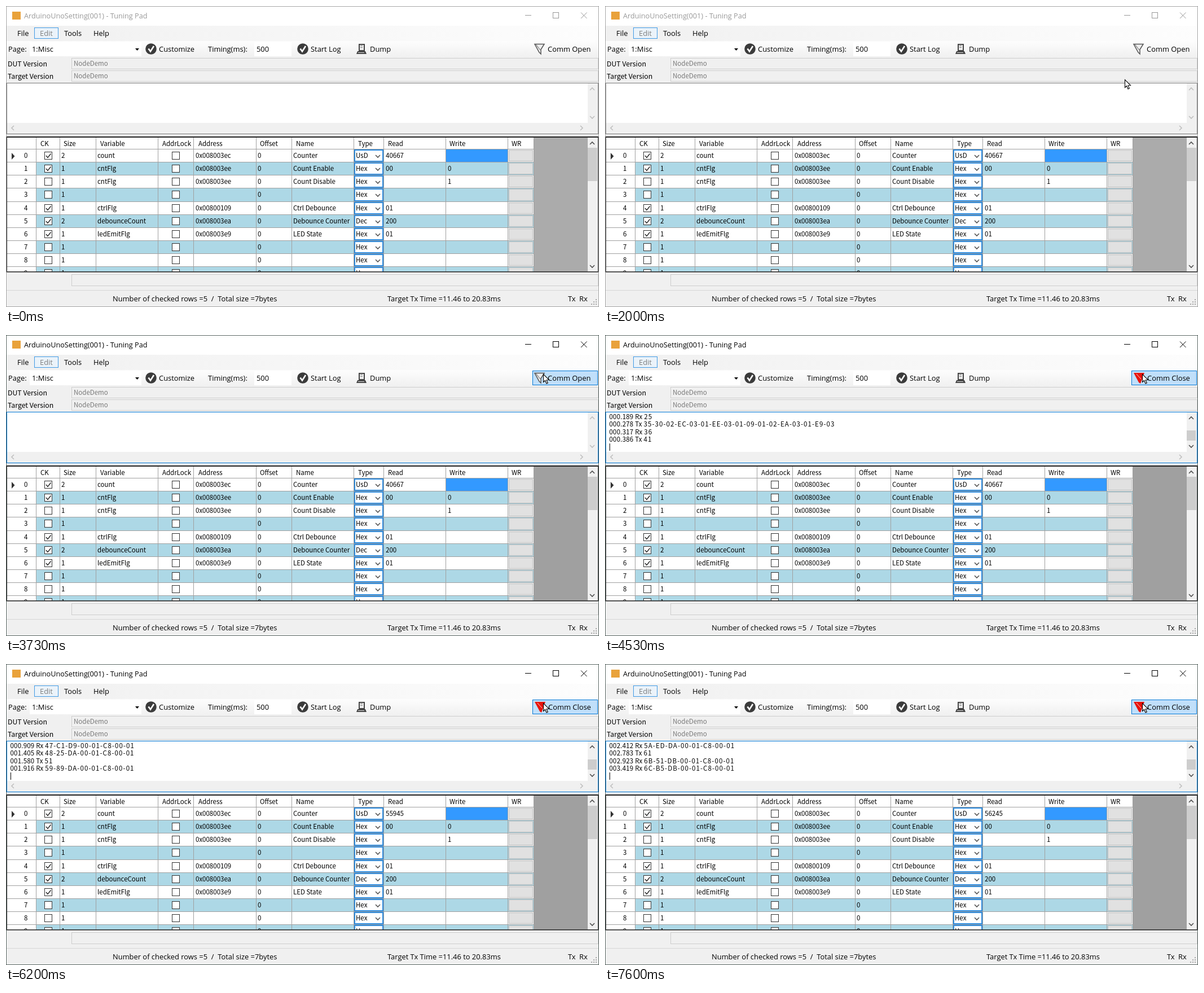
These frames come from a looping animation (1051 by 533 pixels, 8 s). An HTML page with a canvas:

```html
<!DOCTYPE html>
<html lang="en">
<head>
<meta charset="utf-8">
<title>Serial monitor</title>
<style>
html, body { margin: 0; width: 100%; height: 100%; overflow: hidden; background: #f0f0f0; }
canvas { display: block; }
</style>
</head>
<body>
<canvas id="stage" width="1051" height="533"></canvas>
<script>
const c = document.getElementById('stage').getContext('2d');
const LOOP = 8000, TICK = 0.015; // ticks per ms
const UI = '12.9px "Open Sans", "Noto Sans", sans-serif';
const GRID = '11.5px "Noto Sans CJK JP", "Noto Sans", sans-serif';
const LABEL = '12.3px "Noto Sans CJK JP", "Noto Sans", sans-serif';
const BLUE = '#0078d7', FACE = '#f0f0f0', RULE = '#a0a0a0';

// Ticks of the main events
const ACTIVATE = 48, CARET_OFF = 56, PRESS = 58, OPEN = 61;

const log = [
  [61, '000.022 Tx 11'],
  [63, '000.100 Rx 12'], [63, '000.144 Tx 24'],
  [65, '000.189 Rx 25'],
  [66, '000.278 Tx 35-30-02-EC-03-01-EE-03-01-09-01-02-EA-03-01-E9-03'],
  [67, '000.317 Rx 36'], [67, '000.386 Tx 41'],
  [75, '000.909 Rx 47-C1-D9-00-01-C8-00-01'],
  [83, '001.405 Rx 48-25-DA-00-01-C8-00-01'],
  [86, '001.580 Tx 51'],
  [91, '001.916 Rx 59-89-DA-00-01-C8-00-01'],
  [98, '002.412 Rx 5A-ED-DA-00-01-C8-00-01'],
  [103, '002.783 Tx 61'],
  [106, '002.923 Rx 6B-51-DB-00-01-C8-00-01'],
  [112, '003.419 Rx 6C-B5-DB-00-01-C8-00-01']
];
const txOn = [[61, 63], [63, 65], [66, 67], [67, 68], [103, 104]];
const rxOn = [[65, 66], [75, 76], [83, 84], [91, 93], [98, 99], [106, 108], [113, 114]];

// Pointer path: tick, x, y
const path = [[13, 1003, 392], [20, 882, 235], [24, 882, 235], [30, 921, 130],
  [35, 1000, 64], [37, 1037, 70], [39, 952, 69]];

const cols = [53, 95, 159, 269, 332, 443, 506, 616, 669, 779, 889, 935];
const heads = [['CK', 61], ['Size', 102], ['Variable', 167], ['AddrLock', 277], ['Address', 341],
  ['Offset', 450], ['Name', 514], ['Type', 624], ['Read', 677], ['Write', 786], ['WR', 896]];
const rows = [
  { ck: 1, size: 2, v: 'count', a: '0x008003ec', name: 'Counter', type: 'UsD', read: '40667' },
  { ck: 1, v: 'cntFlg', a: '0x008003ee', name: 'Count Enable', read: '00', write: '0' },
  { v: 'cntFlg', a: '0x008003ee', name: 'Count Disable', write: '1' },
  {},
  { ck: 1, v: 'ctrlFlg', a: '0x00800109', name: 'Ctrl Debounce', read: '01' },
  { ck: 1, size: 2, v: 'debounceCount', a: '0x008003ea', name: 'Debounce Counter', type: 'Dec', read: '200' },
  { ck: 1, v: 'ledEmitFlg', a: '0x008003e9', name: 'LED State', read: '01' },
  {}, {}, {}
];

function rect(x, y, w, h, fill) {
  c.fillStyle = fill;
  c.fillRect(x, y, w, h);
}
function frame(x, y, w, h, edge, fill, lw = 1) {
  if (fill) rect(x, y, w, h, fill);
  c.strokeStyle = edge;
  c.lineWidth = lw;
  c.strokeRect(x + lw / 2, y + lw / 2, w - lw, h - lw);
}
function text(s, x, y, font = UI, color = '#000') {
  c.font = font;
  c.fillStyle = color;
  c.fillText(s, x, y);
}
function trace(pts, close) {
  c.beginPath();
  pts.forEach(([x, y]) => c.lineTo(x, y));
  if (close) c.closePath();
}
function line(pts, color, lw = 1) {
  trace(pts);
  c.strokeStyle = color;
  c.lineWidth = lw;
  c.stroke();
}
function poly(pts, fill, edge, lw = 1) {
  trace(pts, true);
  if (fill) { c.fillStyle = fill; c.fill(); }
  if (edge) { c.strokeStyle = edge; c.lineWidth = lw; c.stroke(); }
}
function chevron(x, y, dir, color, s = 4) {
  const d = s * 0.5;
  const shape = {
    up: [[-s, d], [0, -d], [s, d]], down: [[-s, -d], [0, d], [s, -d]],
    left: [[d, -s], [-d, 0], [d, s]], right: [[-d, -s], [d, 0], [-d, s]]
  }[dir];
  line(shape.map(([a, b]) => [x + a, y + b]), color, 1.6);
}
function gradient(x1, y1, from, to) {
  const g = c.createLinearGradient(0, y1 ? 62 : 0, x1, y1);
  g.addColorStop(0, from);
  g.addColorStop(1, to);
  return g;
}

function titleBar(active) {
  const ink = active ? '#000' : '#999';
  rect(0, 0, 1051, 35, '#fff');
  rect(11, 10, 15, 14, '#e9a23b');
  text('ArduinoUnoSetting(001) - Tuning Pad', 32, 22,
    '12.7px "Open Sans", "Noto Sans", sans-serif', ink);
  rect(920, 16, 11, 1, ink);
  frame(969, 11, 11, 11, ink);
  line([[1019, 11.5], [1029.5, 22]], ink);
  line([[1029.5, 11.5], [1019, 22]], ink);
}

function tick(x, y) {
  c.beginPath();
  c.arc(x, y, 9.8, 0, 7);
  c.fillStyle = '#3b3b3b';
  c.fill();
  line([[x - 4.5, y - 0.5], [x - 1, y + 4.5], [x + 5, y - 5]], '#fff', 2.6);
}

function dumpIcon() {
  frame(625, 67, 11, 13, '#444', '#eee', 2);
  rect(628, 70, 4, 1, '#777');
  rect(628, 73, 4, 1, '#777');
  poly([[623, 80], [637, 80], [639, 85], [621, 85]], '#444');
  rect(624, 82, 11, 1, '#ddd');
}

function toolBars(k) {
  rect(0, 35, 1051, 27, gradient(1051, 0, '#f0f0f0', '#fdfdfd'));
  rect(0, 62, 1051, 29, gradient(0, 91, '#fdfdfd', '#f0f0f0'));
  frame(50, 38, 43, 20, '#3f9ae5', '#ebf3fa');
  text('File', 20, 53);
  text('Edit', 60, 53, UI, '#7d7d7d');
  text('Tools', 103, 53);
  text('Help', 155, 53);

  rect(42, 64, 198, 25, '#fff');
  rect(440, 64, 66, 25, '#fff');
  text('Page:', 4, 81);
  text('1:Misc', 46, 81);
  poly([[229, 75], [236, 75], [232.5, 79]], '#000');
  tick(257, 76);
  text('Customize', 271, 81);
  text('Timing(ms):', 358, 81);
  text('500', 444, 81);
  tick(526, 76);
  text('Start Log', 540, 81);
  dumpIcon();
  text('Dump', 645, 81);

  if (k >= ACTIVATE) {
    const down = k >= PRESS && k < OPEN;
    frame(933, 63, 116, 26, BLUE, down ? '#80bceb' : '#c0dffa');
  }
  if (k >= OPEN) {
    poly([[937, 67], [956, 67], [949, 86], [946, 84]], '#e8140c');
    line([[942, 69], [950, 78]], '#fff', 0.8);
    text('Comm Close', 961, 81);
  } else {
    poly([[937, 67.5], [954, 67.5], [948, 77], [948, 85], [945, 82]], '#eee', '#555', 1.5);
    line([[939, 68], [947, 78]], '#777', 1.2);
    text('Comm Open', 960, 81);
  }
}

function versions() {
  [['DUT Version', 92], ['Target Version', 114]].forEach(([s, y]) => {
    text(s, 3, y + 15, LABEL);
    frame(116, y, 934, 20, '#cdcdcd', FACE);
    text('NodeDemo', 120, y + 14, GRID, '#777');
  });
}

// Time stamp and direction, then the looser spaced bytes
function logLine(s, x, y) {
  const head = s.slice(0, 11);
  c.letterSpacing = '0.2px';
  text(head, x, y, GRID);
  const w = c.measureText(head).width;
  c.letterSpacing = '1.1px';
  text(s.slice(11), x + w, y, GRID);
  c.letterSpacing = '0px';
}

function logBox(k, hover) {
  const lines = log.filter(e => e[0] <= k).map(e => e[1]);
  const active = k >= ACTIVATE;
  frame(1, 136, 1049, 91, active ? BLUE : hover ? '#171717' : '#7a7a7a', '#fff');
  rect(2, 207, 1047, 19, FACE);
  rect(1031, 137, 18, 70, FACE);
  const full = lines.length > 4, arrow = full ? '#505050' : '#bfbfbf';
  chevron(1039, 147, 'up', arrow);
  chevron(1039, 197, 'down', arrow);
  chevron(12, 216, 'left', '#bfbfbf');
  chevron(1020, 216, 'right', '#bfbfbf');
  if (full) rect(1031, 169, 16, 18, '#cdcdcd');

  const shown = lines.slice(-4);
  shown.forEach((s, i) => logLine(s, 7.5, Math.round(149 + i * 13.25)));
  if (active && (k < CARET_OFF || k >= OPEN)) rect(8, Math.round(139 + shown.length * 13.25), 1, 13, '#000');
}

function checkBox(x, y, on) {
  frame(x, y - 7, 14, 14, '#333', '#fff');
  if (on) line([[x + 3, y], [x + 6, y + 3.5], [x + 11.5, y - 3.5]], '#222', 1.4);
}

const rowTop = i => Math.round(254 + 23.15 * i);

function gridRow(r, i, counter) {
  const top = rowTop(i), h = rowTop(i + 1) - top, y = top + 11, base = y + 4;
  const put = (s, x) => s !== undefined && text(s, x, base, GRID);
  rect(54, top, 881, h, i % 2 ? '#add8e6' : '#fff');
  rect(2, top, 52, h, '#fff');
  if (i === 0) {
    poly([[10, y - 5], [15.5, y + 1], [10, y + 7]], '#333');
    rect(780, top, 109, h, '#3399ff');
  }
  rect(2, top + h - 1, 934, 1, RULE);
  put(String(i), 32);
  checkBox(68, y, r.ck);
  put(String(r.size || 1), 98);
  put(r.v, 162);
  checkBox(294, y, false);
  put(r.a, 336);
  put('0', 446);
  put(r.name, 509);
  frame(617, top, 52, h - 1, '#2e8bdd', '#fff', 2);
  put(r.type || 'Hex', 620);
  chevron(659, y + 1, 'down', '#555');
  put(i === 0 && counter ? counter : r.read, 673);
  put(r.write, 783);
  frame(891, top + 1, 43, h - 3, '#bcbcbc', '#e1e1e1');
}

function grid(k) {
  const data = log.filter(e => e[0] <= k && /Rx ..-/.test(e[1])).pop();
  let counter = '';
  if (data) {
    const bytes = data[1].slice(11).split('-');
    counter = String(parseInt(bytes[2] + bytes[1], 16));
  }
  c.save();
  c.beginPath();
  c.rect(1, 231, 1049, 240);
  c.clip();
  rect(1, 231, 1049, 240, k >= ACTIVATE ? '#a0a0a0' : '#ababab');
  rect(2, 233, 934, 21, '#fff');
  heads.forEach(([s, x]) => text(s, x, 247.5, GRID));
  rect(2, 253, 934, 1, RULE);
  rows.forEach((r, i) => gridRow(r, i, counter));
  cols.forEach(x => rect(x, 233, 1, 238, RULE));
  rect(1031, 233, 18, 237, FACE);
  rect(1031, 251, 17, 59, '#cdcdcd');
  chevron(1039, 243, 'up', '#505050');
  chevron(1039, 461, 'down', '#505050');
  c.restore();
  rect(1, 231, 1049, 2, '#222');
  rect(1, 470, 1049, 1.5, '#222');
  rect(1, 231, 1, 240, '#222');
  rect(1049, 231, 1, 240, '#222');
}

function statusBar(k) {
  const lit = spans => spans.some(([a, b]) => k >= a && k < b);
  frame(116, 475, 934, 21, '#cdcdcd', FACE);
  rect(1, 503, 1049, 1, '#d7d7d7');
  text('Number of checked rows =5  /  Total size =7bytes', 189, 523);
  text('Target Tx Time =11.46 to 20.83ms', 676, 523);
  if (lit(txOn)) rect(993, 507, 20, 24, '#f00');
  if (lit(rxOn)) rect(1013, 507, 20, 24, '#f00');
  text('Tx', 996, 523);
  text('Rx', 1016, 523);
  for (let i = 0; i < 3; i++)
    for (let j = 0; j <= i; j++) rect(1045 - j * 4, 519 + i * 4, 2, 2, '#a8a8a8');
}

function pointerAt(k) {
  if (k < path[0][0]) return null;
  const n = path.findIndex(p => p[0] > k);
  if (n < 0) return path[path.length - 1].slice(1);
  const [ta, xa, ya] = path[n - 1], [tb, xb, yb] = path[n];
  const u = (k - ta) / (tb - ta);
  return [Math.round(xa + (xb - xa) * u), Math.round(ya + (yb - ya) * u)];
}

function pointer([x, y]) {
  if (y > 136 && y < 207) {
    line([[x - 3, y - 8], [x, y - 7], [x + 3, y - 8]], '#000');
    line([[x, y - 7], [x, y + 7]], '#000');
    line([[x - 3, y + 8], [x, y + 7], [x + 3, y + 8]], '#000');
    return;
  }
  const shape = [[0.5, 0.5], [0.5, 14.5], [3.5, 11.5], [6, 17], [8.3, 16], [6, 10.8], [10.5, 10.5]];
  poly(shape.map(([a, b]) => [x + a, y + b]), '#fff', '#000', 1.1);
}

function draw(k) {
  const at = pointerAt(k), active = k >= ACTIVATE;
  rect(0, 0, 1051, 533, FACE);
  titleBar(active);
  toolBars(k);
  versions();
  logBox(k, at && at[1] >= 136 && at[1] < 227);
  grid(k);
  statusBar(k);
  frame(0, 0, 1051, 533, active ? '#5a6663' : '#a5a5a5');
  if (at) pointer(at);
}

const start = performance.now();
let last = -1;
function loop() {
  const t = (performance.now() - start) % LOOP;
  const k = Math.floor((t + 5) * TICK);
  if (k !== last) draw(last = k);
  requestAnimationFrame(loop);
}
loop();
</script>
</body>
</html>
```
